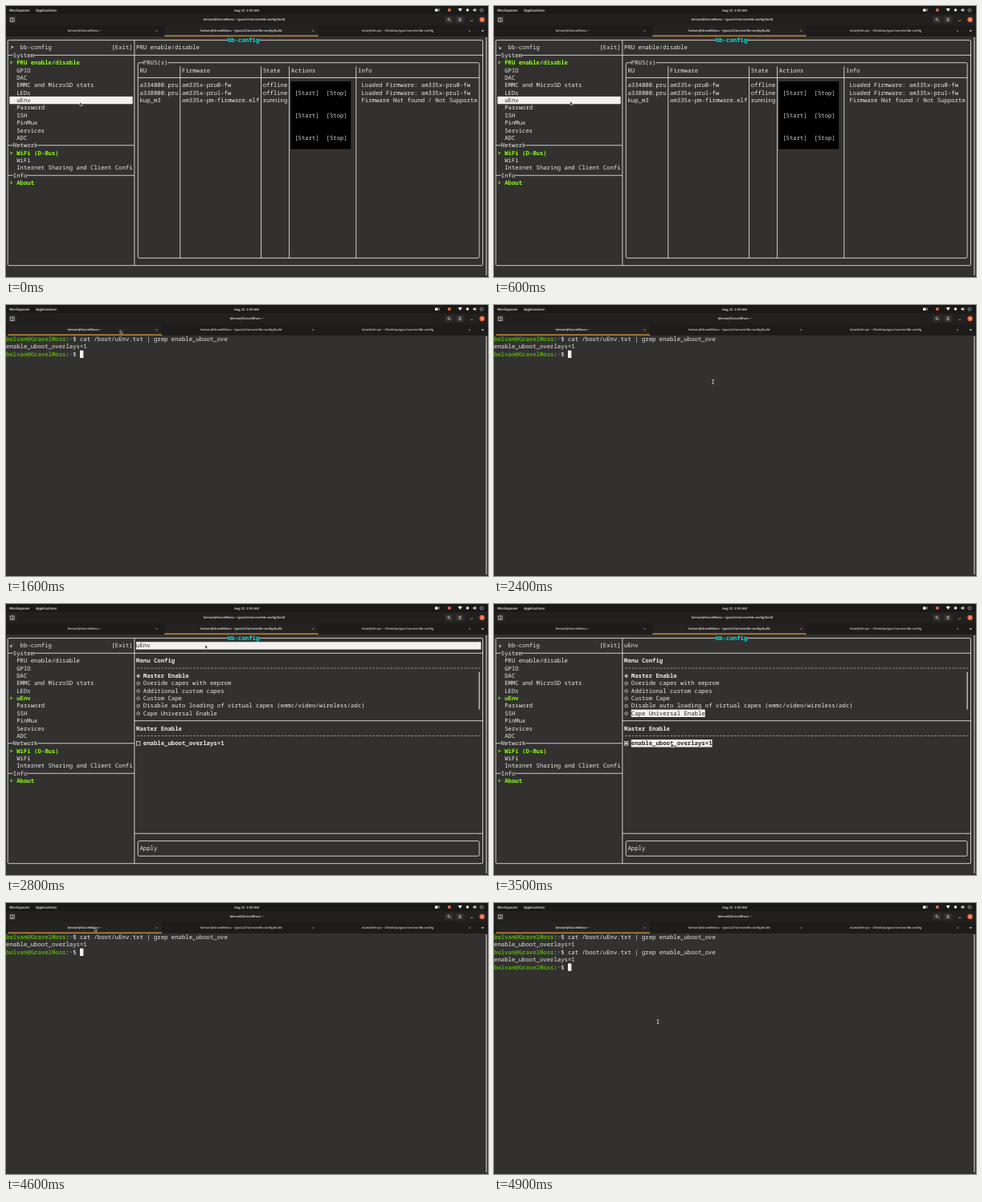
Recreate the animation shown at these times as an HTML page. Size 600 by 338 pixels, loop 5000 ms.

```html
<!DOCTYPE html>
<html lang="en">
<head>
<meta charset="utf-8">
<title>bb-config terminal session</title>
<style>
  html, body { margin: 0; width: 100%; height: 100%; overflow: hidden; background: #32312f; }
  svg { display: block; width: 600px; height: 338px; }
  text { white-space: pre; text-rendering: geometricPrecision; }
  .mono { font: 7.3px "Noto Sans Mono", "DejaVu Sans Mono", monospace; }
  .ui { font: 600 3.9px "Open Sans", "Noto Sans", sans-serif; }
  .bold { font-weight: 700; }
</style>
</head>
<body>
<svg id="stage" viewBox="0 0 600 338" xmlns="http://www.w3.org/2000/svg"></svg>
<script>
const LOOP = 5000, STEP = 100;
const CELL = 4.38, ROW = 9.37, TOP = 42.6;
const BG = '#32312f', FG = '#ebebe8', LINE = '#dededb', LIT = '#f2f1ef', INK = '#2b2a28';
const LIME = '#8aff12', CYAN = '#08e3e3', GOLD = '#e9a140';
const HOST = 'belvan@GravelMoss';
const BUILD = HOST + ': ~/gsoc22/service/bb-config/build';

const colX = c => c * CELL;
const midX = c => (c + 0.5) * CELL;
const midY = r => TOP + r * ROW;

const rect = (x, y, w, h, fill, extra = '') =>
  `<rect x="${x}" y="${y}" width="${w}" height="${h}" fill="${fill}" ${extra}/>`;
const path = (d, stroke = LINE, width = 0.9, extra = '') =>
  `<path d="${d}" fill="none" stroke="${stroke}" stroke-width="${width}" ${extra}/>`;
const hLine = (r, c1, c2) => path(`M${midX(c1)} ${midY(r)}H${midX(c2)}`);
const vLine = (c, r1, r2) => path(`M${midX(c)} ${midY(r1)}V${midY(r2)}`);
const frame = (c1, r1, c2, r2, stroke = LINE) =>
  rect(midX(c1), midY(r1), (c2 - c1) * CELL, (r2 - r1) * ROW, 'none',
    `rx="1.5" stroke="${stroke}" stroke-width="0.9"`);
const cells = (c, r, w, h, fill) =>
  rect(colX(c), midY(r) - ROW / 2, w * CELL, h * ROW, fill);
const mono = (c, r, str, fill = FG, bold = false) =>
  `<text class="mono${bold ? ' bold' : ''}" x="${colX(c)}" y="${midY(r) + 2.5}" fill="${fill}">${str}</text>`;
const ui = (x, y, str, fill = '#e4e2df', anchor = 'middle', size = 3.9) =>
  `<text class="ui" x="${x}" y="${y}" fill="${fill}" text-anchor="${anchor}" style="font-size:${size}px">${str}</text>`;
const label = (c, r, str, lit, bold = false) =>
  (lit ? cells(c, r, str.length, 1, LIT) : '') + mono(c, r, str, lit ? INK : FG, bold);
const caption = (c, r, str) => cells(c, r, str.length, 1, BG) + mono(c, r, str);
const dashes = r =>
  path(`M${colX(37) + 0.9} ${midY(r)}H${colX(135)}`, '#c4c4c1', 0.7, 'stroke-dasharray="2.6 1.78"');

// Each entry changes the state from its time onwards.
const events = [
  [0, { view: 'pru', menu: 'uEnv', item: -1, title: false, boxHover: false, checked: false, apply: false, runs: 1, typed: false }],
  [700, { view: 'uenv' }],
  [900, { menu: '' }],
  [1000, { item: 1 }],
  [1400, { item: -1 }],
  [1500, { view: 'shell' }],
  [2600, { view: 'uenv' }],
  [2700, { title: true }],
  [2900, { title: false }],
  [3200, { item: 5 }],
  [3300, { boxHover: true }],
  [3400, { checked: true }],
  [4000, { item: -1, boxHover: false, apply: true }],
  [4600, { view: 'shell' }],
  [4700, { typed: true }],
  [4800, { typed: false, runs: 2 }]
];

const pointer = [
  [0, 92, 120], [600, 95, 119], [800, 98, 118], [1000, 172, 97], [1100, 183.5, 94.5],
  [1300, 180, 88], [1500, 142, 31], [1600, 142, 31], [1800, 138, 40], [1900, 120, 50],
  [2000, 150, 60], [2200, 278, 128], [2300, 278, 128], [2600, 262, 31], [2700, 260, 32],
  [2800, 248, 51], [2900, 300, 85], [3000, 330, 112], [3200, 245, 136], [3300, 230, 166],
  [3500, 220.5, 174.5], [3700, 220.5, 174.5], [4000, 240, 300], [4200, 250, 304],
  [4400, 308.5, 107.5], [4600, 110, 31], [4700, 110, 32], [4900, 204, 148]
];

const stateAt = t => Object.assign({}, ...events.filter(e => e[0] <= t).map(e => e[1]));

function pointerAt(t) {
  const i = pointer.findIndex(k => k[0] > t);
  if (i < 0) return pointer[pointer.length - 1].slice(1);
  const [t0, x0, y0] = pointer[i - 1], [t1, x1, y1] = pointer[i];
  const p = (t - t0) / (t1 - t0);
  return [x0 + (x1 - x0) * p, y0 + (y1 - y0) * p];
}

function desktop(shell) {
  const tabs = [HOST + ': ~', BUILD, 'olan@elm-pc: ~/Desktop/gsoc/service/bb-config'];
  const active = shell ? 0 : 1;
  const cross = (x, y, r, color) =>
    path(`M${x - r} ${y - r}l${2 * r} ${2 * r}m0 ${-2 * r}l${-2 * r} ${2 * r}`, color, 0.6);
  let out = rect(0, 0, 600, 338, BG) + rect(0, 0, 600, 10, '#1a1918')
    + rect(0, 10, 600, 14, '#22201f') + rect(0, 24, 600, 14, '#1d1c1b');
  out += ui(4, 6.6, 'Workspaces', '#f0eeec', 'start', 4.4)
    + ui(37, 6.6, 'Applications', '#f0eeec', 'start', 4.4)
    + ui(299.5, 6.6, 'Aug 23&#160; 2:39 AM', '#f0eeec', 'middle', 4.1);

  // Status icons
  out += rect(534, 3.5, 3.4, 3.4, '#eee') + path('M537.5 5l1.7-1.4v2.8z', '#eee', 0.5)
    + rect(550, 3.2, 3.8, 3.6, '#d9694c', 'rx="0.6"')
    + '<path d="M562.7 3.6q2.6-1.8 5.2 0l-2.6 3.4z" fill="#eee"/>'
    + '<circle cx="574.5" cy="5" r="1.8" fill="#eee"/>'
    + '<path d="M581.5 4.2h1.2l1.6-1.6v5l-1.6-1.6h-1.2z" fill="#eee"/>'
    + path('M585.3 3.6q1 1.5 0 3', '#eee', 0.5)
    + path('M590.8 3.6a2 2 0 1 0 2.6 0M592.1 2.5v2.3', '#eee', 0.6);

  // Header bar
  out += rect(3, 12.5, 10, 9, '#2c2a29', 'rx="1"') + path('M5.5 19.5v-4.6h4.6v4.6zM7.8 15.8v2.8', '#e8e8e8', 0.7)
    + ui(shell ? 299.8 : 296.5, 18.4, shell ? tabs[0] : BUILD, '#f0eeec')
    + rect(546, 12.5, 11, 9, '#302e2d', 'rx="1"') + rect(559.5, 12.5, 11, 9, '#302e2d', 'rx="1"')
    + '<circle cx="551" cy="16.5" r="1.3" fill="none" stroke="#eee" stroke-width=".6"/>'
    + path('M552 17.5l1.5 1.5', '#eee', 0.7)
    + path('M563.2 15.4h3.8m-3.8 1.6h3.8m-3.8 1.6h3.8', '#eee', 0.6)
    + path('M578.2 18.4h3', GOLD, 0.8)
    + '<circle cx="592.6" cy="17" r="3.2" fill="#f0653a"/>' + cross(592.6, 17, 1, '#fff');

  // Tabs
  tabs.forEach((name, i) => {
    const x = 98 + i * 194.8;
    if (i === active) out += rect(x - 95.5, 24, 191, 13, '#252322');
    out += ui(x, 32.2, name, i === active ? '#f0eeec' : '#d0cecb')
      + cross(x + 89.5, 31, 0.9, '#aaa8a5');
    if (i === active) out += rect(x - 95.5, 36.6, 191.5, 1.2, GOLD);
  });
  out += '<path d="M591.6 30.3h3.4l-1.7 1.9z" fill="#ddd"/>';
  return out + rect(597, 39, 1.8, 297, '#989693');
}

function shellView(s) {
  const prompt = r => mono(0, r, HOST, '#55a80c', true) + mono(17, r, ':')
    + mono(18, r, '~', '#4f7fc0', true) + mono(19, r, '$');
  const command = r => prompt(r) + mono(21, r, 'cat /boot/uEnv.txt | grep enable_uboot_ove');
  let out = '', row = 0;
  for (let i = 0; i < s.runs; i++, row += 2) {
    out += command(row) + mono(0, row + 1, 'enable_uboot_overlays=1');
  }
  return out + (s.typed ? command(row) : prompt(row))
    + cells(s.typed ? 63 : 21, row, 1, 1, LIT);
}

function sidebar(s, step) {
  const groups = [
    [2, 'System', ['PRU enable/disable', 'GPIO', 'DAC', 'EMMC and MicroSD stats', 'LEDs', 'uEnv',
      'Password', 'SSH', 'PinMux', 'Services', 'ADC'], s.view === 'pru' ? 0 : 5],
    [14, 'Network', ['WiFi (D-Bus)', 'WiFi', 'Internet Sharing and Client Confi'], 0],
    [18, 'Info', ['About'], 0]
  ];
  const turn = step < 26 ? 3 - step : step < 38 ? 7 + 2 * (Math.min(step, 35) - 28) : 50 - step;
  let out = `<g transform="translate(${midX(1) + 0.4} ${midY(1)}) rotate(${45 * turn})">`
    + path('M2.1 0H-2M-.4-1.5L-2 0L-.4 1.5', FG, 0.7) + '</g>'
    + mono(4, 1, 'bb-config') + mono(30, 1, '[Exit]');
  for (const [row, name, entries, selected] of groups) {
    out += hLine(row, 0, 36) + caption(2, row, name);
    entries.forEach((entry, i) => {
      const r = row + 1 + i, lit = entry === s.menu, on = i === selected;
      if (lit) out += cells(1, r, 35, 1, LIT);
      if (on) out += mono(1, r, '&gt;', lit ? INK : LIME, true);
      out += mono(3, r, entry, lit ? INK : on ? LIME : FG, on);
    });
  }
  return out;
}

function pruPanel() {
  const columns = [38, 50, 73, 81, 101];
  const rows = [
    ['a334000.pru', 'am335x-pru0-fw', 'offline', '', 'Loaded Firmware: am335x-pru0-fw'],
    ['a338000.pru', 'am335x-pru1-fw', 'offline', '', 'Loaded Firmware: am335x-pru1-fw'],
    ['kup_m3', 'am335x-pm-firmware.elf', 'running', '', 'Firmware Not found / Not Supporte']
  ];
  let out = mono(37, 1, 'PRU enable/disable') + frame(37, 3, 134, 29) + caption(39, 3, 'PRUS(s)')
    + hLine(5, 37, 134) + [49, 72, 80, 99].map(c => vLine(c, 3.5, 29)).join('')
    + cells(81, 6, 17, 9, '#000');
  ['RU', 'Firmware', 'State', 'Actions', 'Info'].forEach((name, i) => {
    out += mono(i === 4 ? 100 : columns[i], 4, name);
  });
  rows.forEach((row, i) => {
    row.forEach((value, j) => { out += mono(columns[j], 6 + i, value); });
    out += mono(82, 7 + 3 * i, '[Start]', '#cfcfcc') + mono(91, 7 + 3 * i, '[Stop]', '#cfcfcc');
  });
  return out;
}

function uenvPanel(s) {
  const items = ['Master Enable', 'Overide capes with eeprom', 'Additional custom capes', 'Custom Cape',
    'Disable auto loading of virtual capes (emmc/video/wireless/adc)', 'Cape Universal Enable'];
  const x = midX(37) + 0.4;
  let out = (s.title ? cells(37, 1, 98, 1, LIT) : '') + mono(37, 1, 'uEnv', s.title ? INK : FG)
    + mono(37, 3, 'Menu Config', FG, true) + dashes(4);
  items.forEach((name, i) => {
    const y = midY(5 + i) + 0.3;
    out += `<circle cx="${x}" cy="${y}" r="1.8" fill="none" stroke="${FG}" stroke-width=".7"/>`;
    if (i === 0) out += `<circle cx="${x}" cy="${y}" r="1" fill="${FG}"/>`;
    out += label(39, 5 + i, name, i === s.item, i === 0);
  });
  const boxY = midY(14);
  out += path(`M${midX(134)} ${midY(4.5)}V${midY(9.5)}`, FG, 1.1) + hLine(11, 36, 135)
    + mono(37, 12, 'Master Enable', FG, true) + dashes(13)
    + rect(x - 2.3, boxY - 2.2, 4.6, 4.6, 'none', `stroke="${FG}" stroke-width=".7"`)
    + (s.checked ? rect(x - 1.2, boxY - 1.1, 2.4, 2.4, FG) : '')
    + label(39, 14, 'enable_uboot_overlays=1', s.boxHover, true)
    + hLine(26, 36, 135);
  if (s.apply) out += cells(37, 27, 98, 3, LIT);
  return out + frame(37, 27, 134, 29, s.apply ? INK : LINE)
    + mono(38, 28, 'Apply', s.apply ? INK : FG);
}

function appView(s, step) {
  return frame(0, 0, 135, 30) + vLine(36, 0, 30) + hLine(2, 36, 135)
    + cells(63, 0, 9, 1, BG) + mono(63, 0, 'bb-config', CYAN, true)
    + sidebar(s, step) + (s.view === 'pru' ? pruPanel() : uenvPanel(s));
}

function cursor(t, shell) {
  const [x, y] = pointerAt(t);
  const shape = shell && y > 38
    ? path('M-1.2-2.3H1.2M0-2.3V2.3M-1.2 2.3H1.2', '#f4f4f4', 0.7)
    : '<path d="M0 0V4.4L1.1 3.5L1.9 5.1L2.7 4.7L2 3.2H3.3Z" fill="#111" stroke="#f4f4f4" stroke-width=".5"/>';
  return `<g transform="translate(${x} ${y})">${shape}</g>`;
}

const stage = document.getElementById('stage');
let lastStep = -1;

function render(now) {
  const step = Math.floor((now % LOOP) / STEP);
  if (step !== lastStep) {
    lastStep = step;
    const t = step * STEP, s = stateAt(t), shell = s.view === 'shell';
    stage.innerHTML = desktop(shell) + (shell ? shellView(s) : appView(s, step)) + cursor(t, shell);
  }
}

const start = performance.now();
function tick() {
  render(performance.now() - start);
  requestAnimationFrame(tick);
}
tick();
</script>
</body>
</html>
```
